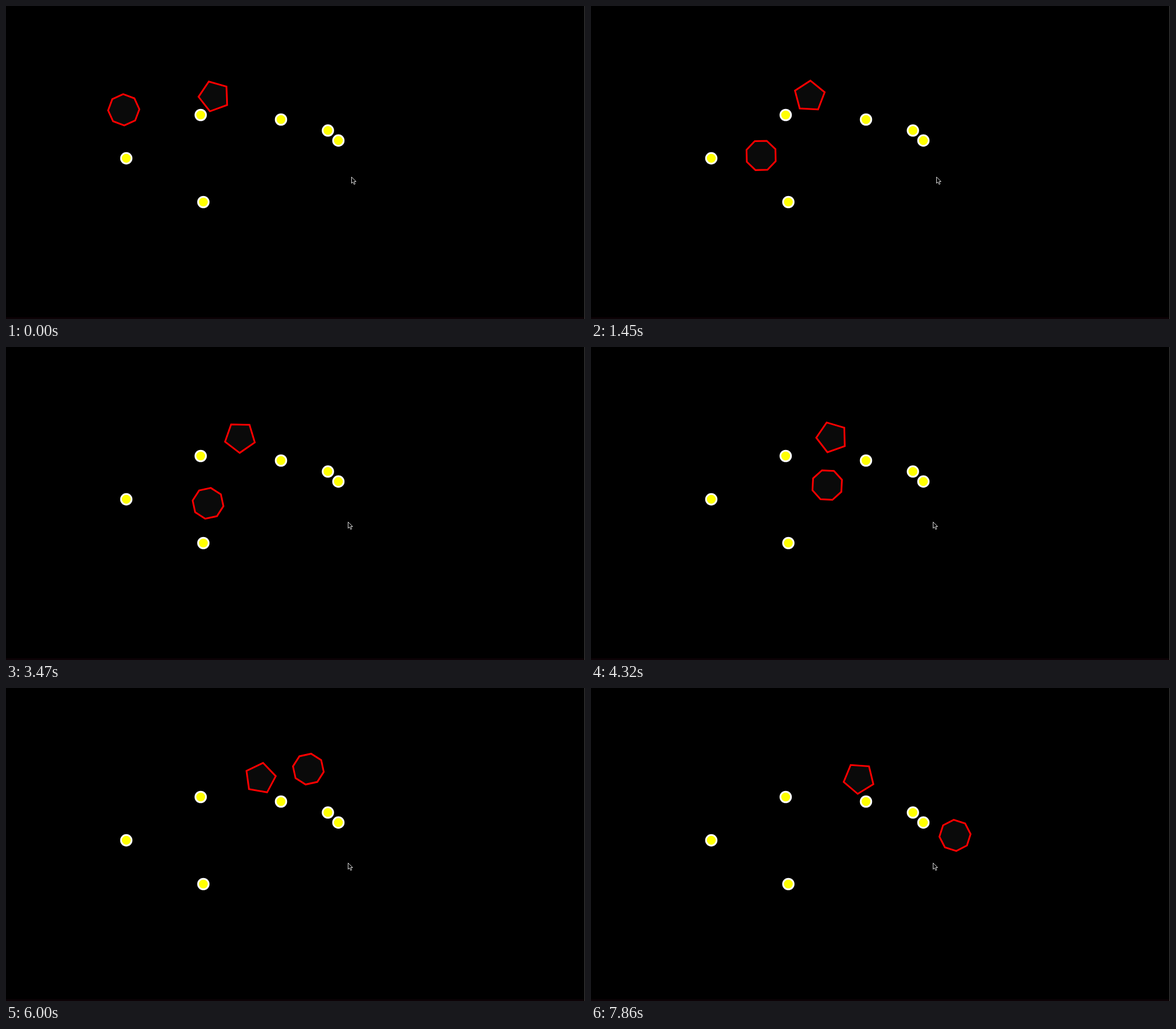
Write an HTML page with a canvas that moves like this. It is 1018 px wide and 550 px high and loops after 8 s.

```html
<!DOCTYPE html>
<html lang="en">
<head>
<meta charset="utf-8">
<title>Rolling polygons</title>
<style>
  html, body { margin: 0; width: 100%; height: 100%; overflow: hidden; background: #000; }
  canvas { display: block; }
</style>
</head>
<body>
<canvas id="stage" width="1018" height="550"></canvas>
<script>
const ctx = document.getElementById('stage').getContext('2d');
const LOOP = 8000;
const STEP = 142.5;
const LAST_STEP = 55;
const TAU = 2 * Math.PI;
const RADIUS = 27.5;

const DOTS = [[342.3, 191.5], [211.5, 267.6], [347, 344.5], [483.5, 199.5], [566, 218.8], [584.4, 236.4]];

// Waypoints of the octagon: step, x, y.
const PATH = [
  [0, 207, 182.4], [10, 299.1, 262.7], [15, 315.2, 310.8], [24, 355.2, 274.7],
  [30, 415.3, 242.6], [42, 531.6, 142.5], [48, 590.5, 171], [55, 640, 259]
];

const slope = (a, b, axis) => (b[axis] - a[axis]) / (b[0] - a[0]);

function tangent(i, axis) {
  const [a, b, c] = [PATH[i - 1], PATH[i], PATH[i + 1]];
  if (!a) return slope(b, c, axis);
  if (!c) return slope(a, b, axis);
  return (slope(a, b, axis) * (c[0] - b[0]) + slope(b, c, axis) * (b[0] - a[0])) / (c[0] - a[0]);
}

// Smooth cubic curve through the waypoints.
function octagonAt(step) {
  const i = Math.max(0, PATH.findIndex(point => point[0] >= step) - 1);
  const a = PATH[i], b = PATH[i + 1], span = b[0] - a[0];
  const u = (step - a[0]) / span, v = 1 - u;
  return [1, 2].map(axis =>
    a[axis] * (1 + 2 * u) * v * v + b[axis] * u * u * (3 - 2 * u) +
    span * u * v * (tangent(i, axis) * v - tangent(i + 1, axis) * u));
}

// Steady travel with a slight lag in the first half.
function travelAt(step) {
  const u = step / LAST_STEP;
  return 105 * u - 0.9 * Math.sin(TAU * u);
}

// The pointer speeds up to its resting place.
function pointerAt(time) {
  const u = Math.min(1, Math.max(0, (time - 1100) / 1500)) ** 1.75;
  return [Math.round(607 - 6 * u), Math.round(300 + 7 * u)];
}

function outline(points) {
  ctx.beginPath();
  points.forEach(([x, y]) => ctx.lineTo(x, y));
  ctx.closePath();
}

function paint(fill, stroke, width) {
  ctx.fillStyle = fill;
  ctx.strokeStyle = stroke;
  ctx.lineWidth = width;
  ctx.fill();
  ctx.stroke();
}

function polygon([x, y], sides, degrees) {
  outline(Array.from({ length: sides }, (_, i) => {
    const angle = TAU * (degrees / 360 + i / sides);
    return [x + RADIUS * Math.cos(angle), y + RADIUS * Math.sin(angle)];
  }));
  paint('#0a0a0a', '#f00', 3);
}

function dot([x, y]) {
  ctx.beginPath();
  ctx.arc(x, y, 9.3, 0, TAU);
  paint('#ff0', '#fff', 3);
}

function pointer([x, y]) {
  const shape = [[0, 0], [0, 11], [2.5, 8.7], [4.5, 13], [6.3, 12.2], [4.6, 8], [8, 8]];
  outline(shape.map(([dx, dy]) => [x + dx + 0.5, y + dy + 0.5]));
  paint('#000', '#ddd', 1);
}

function draw(step) {
  ctx.fillStyle = '#000';
  ctx.fillRect(0, 0, 1018, 550);
  ctx.fillStyle = '#0c0206';
  ctx.fillRect(0, 547, 1018, 3);
  ctx.fillStyle = '#484848';
  ctx.fillRect(1017, 0, 1, 550);

  const travel = travelAt(step);
  const spin = 1.26 * travel;
  DOTS.forEach(dot);
  polygon([366 + travel, 158.6], 5, 34 + spin);
  polygon(octagonAt(step), 8, 43 + spin);
  pointer(pointerAt(step * LOOP / (LAST_STEP + 1)));
}

const start = performance.now();
function tick() {
  const time = (performance.now() - start) % LOOP;
  draw(Math.min(LAST_STEP, Math.floor(time / STEP)));
  requestAnimationFrame(tick);
}
tick();
</script>
</body>
</html>
```
